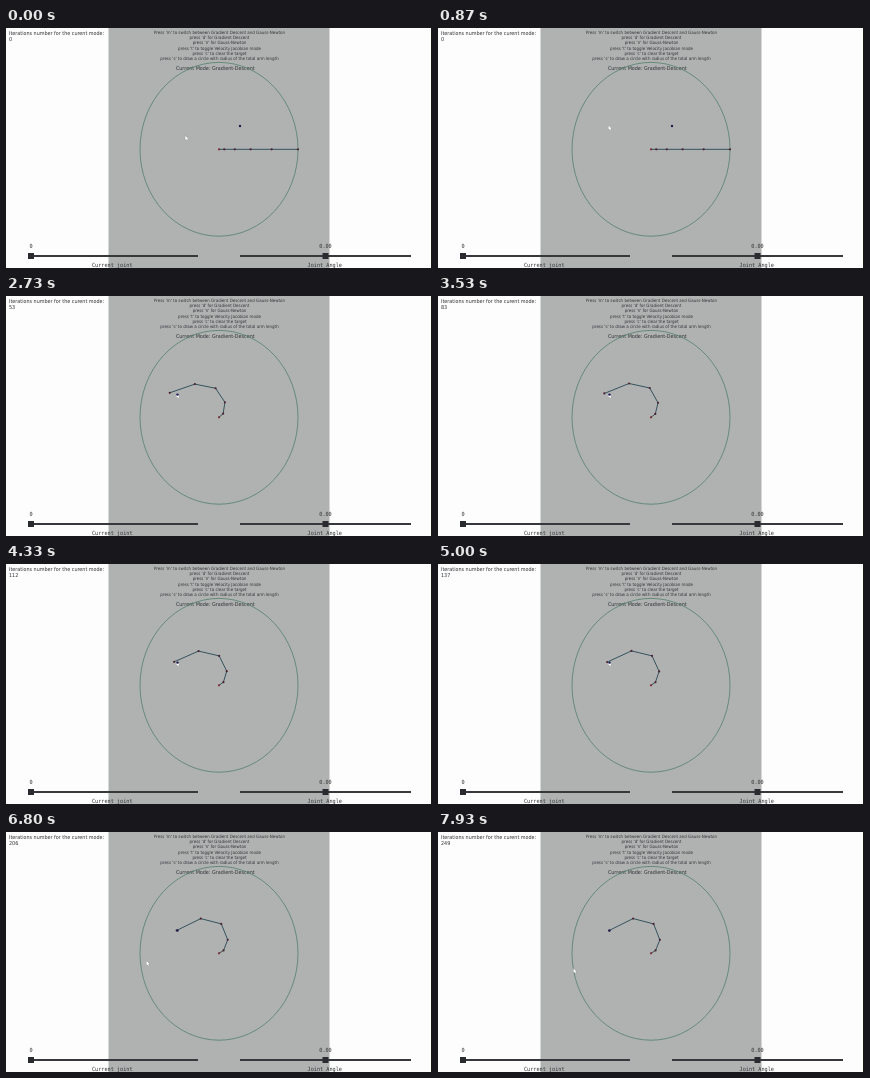
Write an HTML page with a canvas that moves like this. It is 426x240 px and loops after 8000 ms.

```html
<!DOCTYPE html>
<html lang="en">
<head>
<meta charset="utf-8">
<title>Inverse kinematics arm</title>
<style>
html, body { margin: 0; width: 100%; height: 100%; overflow: hidden; background: #fdfdfd; }
canvas { display: block; width: 426px; height: 240px; }
</style>
</head>
<body>
<canvas id="stage"></canvas>
<script>
const W = 426, H = 240, LOOP = 8000, FPS = 15;
const STRETCH = 1.1; // the view is taller than it is wide
const BASE = { x: 213, y: 121.3 };
const LINKS = [1, 2, 3, 4, 5].map(k => k * 79 / 15);
const FIRST_TARGET = [234, 98], CLICKED_TARGET = [171.5, 98.6];
const CLICK_STEP = 17, RATE = 2.35e-5, LAST_ITERATION = 249;
const SANS = '"DejaVu Sans", sans-serif';
const MONO = '"DejaVu Sans Mono", monospace';
const INK = '#303236';

// Pairs of time step and value
const COUNT = [[CLICK_STEP, 0], [26, 21], [41, 53], [65, 112], [86, 164], [102, 206], [119, 249]];
const CURSOR_X = [[0, 179.3], [13, 170.5], [91, 170.5], [102, 140.5], [119, 135.5]];
const CURSOR_Y = [[0, 107.7], [13, 97.6], [91, 97.6], [102, 129], [119, 136.5]];

const HELP = [
  "Press 'm' to switch between Gradient Descent and Gauss-Newton",
  "press 'd' for Gradient Descent",
  "press 'n' for Gauss-Newton",
  "press 't' to toggle Velocity Jacobian mode",
  "press 'c' to clear the target",
  "press 's' to draw a circle with radius of the total arm length"
];

const canvas = document.getElementById('stage');
const ctx = canvas.getContext('2d');
const ratio = window.devicePixelRatio || 1;
canvas.width = W * ratio;
canvas.height = H * ratio;

function track(keys, t) {
  if (t <= keys[0][0]) return keys[0][1];
  for (let i = 1; i < keys.length; i++) {
    const [t0, a] = keys[i - 1], [t1, b] = keys[i];
    if (t <= t1) return a + (b - a) * (t - t0) / (t1 - t0);
  }
  return keys[keys.length - 1][1];
}

// Joint positions relative to the base, y upwards
function forward(angles) {
  const points = [[0, 0]];
  let x = 0, y = 0, sum = 0;
  angles.forEach((a, i) => {
    sum += a;
    x += LINKS[i] * Math.cos(sum);
    y += LINKS[i] * Math.sin(sum);
    points.push([x, y]);
  });
  return points;
}

// Gradient descent with the transposed Jacobian
function solve() {
  const tx = CLICKED_TARGET[0] - BASE.x;
  const ty = (BASE.y - CLICKED_TARGET[1]) / STRETCH;
  let angles = LINKS.map(() => 0);
  const poses = [forward(angles)];
  for (let n = 0; n < LAST_ITERATION; n++) {
    const points = poses[n];
    const [ex, ey] = points[LINKS.length];
    angles = angles.map((a, i) => {
      const rx = ex - points[i][0], ry = ey - points[i][1];
      return a + RATE * (rx * (ty - ey) - ry * (tx - ex));
    });
    poses.push(forward(angles));
  }
  return poses;
}
const poses = solve();

function text(str, x, y, size, align = 'center', family = SANS) {
  ctx.save();
  ctx.translate(x, y);
  ctx.scale(1, STRETCH);
  ctx.font = `${size}px ${family}`;
  ctx.textAlign = align;
  ctx.textBaseline = 'middle';
  ctx.fillStyle = INK;
  ctx.fillText(str, 0, 0);
  ctx.restore();
}

function dot(x, y, r, color) {
  ctx.fillStyle = color;
  ctx.beginPath();
  ctx.arc(x, y, r, 0, Math.PI * 2);
  ctx.fill();
}

function slider(x0, x1, knob, value, label) {
  const mid = (x0 + x1) / 2;
  ctx.fillStyle = '#37383c';
  ctx.fillRect(x0, 227, x1 - x0, 2);
  ctx.fillStyle = '#2a2b2f';
  ctx.fillRect(knob - 3, 225, 6, 6);
  text(value, knob, 218.7, 5.2, 'center', MONO);
  text(label, mid - 0.7, 237.2, 5.2, 'center', MONO);
}

function arm(points) {
  const screen = points.map(([x, y]) => [BASE.x + x, BASE.y - y * STRETCH]);
  ctx.strokeStyle = '#34525c';
  ctx.lineWidth = 1;
  ctx.lineJoin = 'round';
  ctx.beginPath();
  screen.forEach(([x, y]) => ctx.lineTo(x, y));
  ctx.stroke();
  screen.forEach(([x, y], i) => dot(x, y, 1.1, i ? '#4e2431' : '#7c2a30'));
}

function cursor(x, y) {
  const outline = [[0, 0], [0, 4.2], [1, 3.4], [1.8, 4.8], [2.5, 4.4], [1.9, 3.1], [3, 3]];
  ctx.beginPath();
  outline.forEach(([dx, dy]) => ctx.lineTo(x + dx, y + dy));
  ctx.closePath();
  ctx.strokeStyle = '#85878a';
  ctx.lineWidth = 0.6;
  ctx.stroke();
  ctx.fillStyle = '#ffffff';
  ctx.fill();
}

function background() {
  ctx.fillStyle = '#fdfdfd';
  ctx.fillRect(0, 0, W, H);
  ctx.fillStyle = '#b0b2b2';
  ctx.fillRect(102.5, 0, 221, H);
  ctx.fillStyle = '#1a1a14';
  ctx.fillRect(W - 1, 0, 1, H);
}

function draw(ms) {
  const step = Math.floor((ms % LOOP + 4) * FPS / 1000) % (LOOP * FPS / 1000);
  const n = Math.round(track(COUNT, step));

  ctx.setTransform(ratio, 0, 0, ratio, 0, 0);
  background();

  text('Iterations number for the curent mode:', 3, 5.5, 4.85, 'left');
  text(String(n), 3, 12, 4.85, 'left');
  HELP.forEach((line, i) => text(line, 213.5, 4.6 + i * 5.3, 4));
  text('Current Mode: Gradient-Descent', 209.3, 40.3, 4.85);

  ctx.strokeStyle = '#527f6c';
  ctx.lineWidth = 0.8;
  ctx.beginPath();
  ctx.ellipse(BASE.x, BASE.y, 79, 79 * STRETCH, 0, 0, Math.PI * 2);
  ctx.stroke();

  arm(poses[n]);
  cursor(track(CURSOR_X, step), track(CURSOR_Y, step));
  const target = step < CLICK_STEP ? FIRST_TARGET : CLICKED_TARGET;
  dot(target[0], target[1], 1.2, '#1c1c52');

  slider(22, 192, 25, '0', 'Current joint');
  slider(234, 405, 319.5, '0.00', 'Joint Angle');
}

function frame() {
  draw(performance.now());
  requestAnimationFrame(frame);
}
frame();
</script>
</body>
</html>
```
